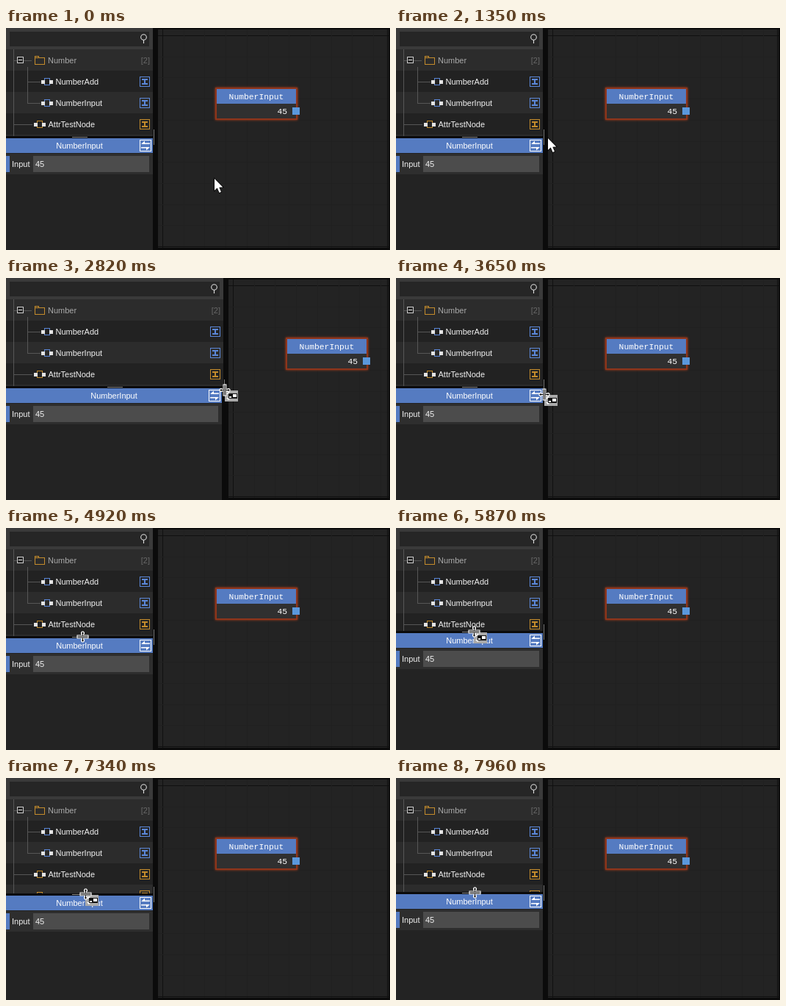
These frames come from a looping animation (523x302 px, 8.87 s). An HTML page with a canvas:

```html
<!DOCTYPE html>
<html lang="en">
<head>
<meta charset="utf-8">
<title>Node editor splitters</title>
<style>
  html, body { margin: 0; width: 100%; height: 100%; overflow: hidden; background: #0b0b0b; }
  canvas { display: block; }
</style>
</head>
<body>
<canvas id="stage" width="523" height="302"></canvas>
<script>
const ctx = document.getElementById('stage').getContext('2d');
const LOOP = 8870, BASE_W = 200, BASE_Y = 148;
const BLUE = '#557bc1', ACCENT = '#5b87d8', ORANGE = '#c48c2c', LINE = '#565656';
const SANS = '11px "Liberation Sans", Arial, sans-serif';
const MONO = '11.33px "Liberation Mono", "Courier New", monospace';

// time, pointer x, pointer y, pointer mode
const steps = [
  [0, 284, 205, 'arrow'], [100, 262, 187, 'arrow'],
  [930, 240, 174, 'arrow'], [1140, 220, 160, 'arrow'], [1350, 207, 150, 'arrow'],
  [1560, 204, 150, 'arrow'], [1770, 202, 151, 'h'], [1970, 202, 152, 'h'],
  [2590, 240, 152, 'hDrag'], [2820, 298, 152, 'hDrag'], [3030, 304, 153, 'hDrag'],
  [3240, 276, 155, 'hDrag'], [3340, 246, 157, 'hDrag'], [3440, 221, 158, 'hDrag'],
  [3650, 202, 158, 'hDrag'], [3860, 202, 158, 'h'],
  [4170, 180, 160, 'arrow'], [4380, 145, 157, 'arrow'], [4590, 118, 152, 'arrow'],
  [4710, 106, 149, 'v'], [4920, 104, 148, 'v'],
  [5870, 106, 141, 'vDrag'], [6080, 108, 132, 'vDrag'], [6290, 109, 136, 'vDrag'],
  [6460, 109, 144, 'vDrag'], [6700, 109, 150, 'vDrag'], [6920, 109, 155, 'vDrag'],
  [7130, 108, 158, 'vDrag'], [7340, 108, 158, 'vDrag'], [7550, 107, 157, 'vDrag'],
  [7760, 107, 156, 'vDrag'], [7960, 107, 156, 'vDone']
];

function rect(x, y, w, h, color) {
  ctx.fillStyle = color;
  ctx.fillRect(x, y, w, h);
}
function frame(x, y, w, h, color) {
  ctx.strokeStyle = color;
  ctx.lineWidth = 1;
  ctx.strokeRect(x + .5, y + .5, w - 1, h - 1);
}
function text(str, x, y, color = '#f2f2f2', align = 'left', font = SANS) {
  ctx.font = font;
  ctx.textAlign = align;
  ctx.textBaseline = 'alphabetic';
  ctx.fillStyle = color;
  ctx.fillText(str, x, y);
}
function shape(points, fill, stroke, width = 1) {
  ctx.beginPath();
  points.forEach(([x, y]) => ctx.lineTo(x, y));
  ctx.closePath();
  if (stroke) {
    ctx.strokeStyle = stroke;
    ctx.lineWidth = width;
    ctx.stroke();
  }
  ctx.fillStyle = fill;
  ctx.fill();
}
function clipped(x, y, w, h, draw) {
  ctx.save();
  ctx.beginPath();
  ctx.rect(x, y, w, h);
  ctx.clip();
  draw();
  ctx.restore();
}

function nodeRow(x, y, label, color, w) {
  frame(x + 4, y - 5, 8, 10, color);
  rect(x, y - 2, 5, 5, '#e4e4e4');
  rect(x + 11, y - 2, 5, 5, '#e4e4e4');
  if (label) text(label, x + 19.5, y + 4);
  const ix = w - 18, iy = y - 7;
  frame(ix, iy, 14, 14, color);
  rect(ix + 3, iy + 3, 8, 2, color);
  rect(ix + 6, iy + 5, 2, 4, color);
  rect(ix + 3, iy + 9, 8, 2, color);
}

function tree(w) {
  for (let i = 0; i < 5; i++) rect(0, 29 + i * 29, w, 29, i % 2 ? '#222' : '#2c2c2c');
  rect(10, 29, 1, 131, LINE);
  rect(10, 44, 25, 1, LINE);
  rect(10, 131, 26, 1, LINE);
  rect(29, 53, 1, 50, LINE);
  rect(29, 73, 18, 1, LINE);
  rect(29, 102, 18, 1, LINE);
  rect(15, 39, 9, 9, '#242424');
  frame(15, 39, 9, 9, '#ccc');
  rect(17, 43, 5, 1, '#eee');

  frame(39, 40, 14, 10, ORANGE);
  frame(39, 38, 6, 3, ORANGE);
  text('Number', 57, 48, '#aaa');
  text('[2]', w - 4, 48, '#686868', 'right');
  nodeRow(48, 73, 'NumberAdd', ACCENT, w);
  nodeRow(48, 102, 'NumberInput', ACCENT, w);
  nodeRow(38, 131, 'AttrTestNode', ORANGE, w);
  nodeRow(38, 160, '', ORANGE, w);
}

function searchBar(w) {
  rect(0, 0, w, 29, '#3a3a3a');
  rect(5, 5, w - 10, 20, '#262626');
  ctx.strokeStyle = '#ddd';
  ctx.lineWidth = 1.1;
  ctx.beginPath();
  ctx.arc(w - 12.5, 12.5, 3.8, 0, Math.PI * 2);
  ctx.moveTo(w - 12.5, 16.5);
  ctx.lineTo(w - 12.5, 21);
  ctx.stroke();
}

function properties(w, dy) {
  ctx.save();
  ctx.translate(0, dy);
  rect(0, 150, w, 200, '#232323');
  rect(0, 150, w, 20, BLUE);
  text('NumberInput', w / 2, 164, '#fff', 'center');
  frame(w - 18, 152, 16, 16, '#fff');
  shape([[w - 16, 158], [w - 11, 153.5], [w - 11, 156.5], [w - 4, 156.5], [w - 4, 158]], '#fff');
  shape([[w - 4, 162], [w - 9, 166.5], [w - 9, 163.5], [w - 16, 163.5], [w - 16, 162]], '#fff');
  rect(0, 171, w, 28, '#2e2e2e');
  rect(0, 174, 5, 22, BLUE);
  text('Input', 8, 189);
  rect(37, 174, w - 42, 22, '#4c4c4c');
  text('45', 40, 189);
  ctx.restore();
}

function graph(w) {
  const shift = w - BASE_W, cell = 28.7;
  clipped(w + 7, 2, 514 - w, 297, () => {
    rect(w + 7, 2, 514 - w, 297, '#232323');
    for (let i = 0; i < 11; i++) {
      const color = i ? '#202020' : '#101010';
      rect(Math.round(213 + shift + i * cell), 2, 1, 298, color);
      rect(w + 7, Math.round(10 + i * cell), 514 - w, 1, color);
    }
    rect(w + 7, 297, 514 - w, 1, '#101010');
    rect(519, 2, 1, 298, '#101010');
    ctx.translate(shift, 0);
    ctx.save();
    ctx.shadowColor = '#b5401c';
    ctx.shadowBlur = 3;
    rect(285, 81, 112, 44, '#8f351b');
    ctx.restore();
    rect(287, 83, 108, 40, '#303030');
    rect(287, 83, 108, 20, BLUE);
    text('NumberInput', 341, 97, '#fff', 'center', MONO);
    text('45', 383, 117, '#fff', 'right', MONO);
    rect(390, 108, 10, 10, '#5b98dc');
  });
}

function pointer(x, y, mode) {
  ctx.save();
  ctx.translate(x, y);
  if (mode === 'arrow') {
    shape([[0, 0], [0, 16], [3.7, 12.6], [6.5, 19], [9, 18], [6.3, 11.8], [11.3, 11.4]], '#fff', '#000', 1.5);
    ctx.restore();
    return;
  }
  if (mode.endsWith('Drag')) {
    rect(0, 1, 18, 15, '#aaa');
    shape([[2, 6], [5, 3], [8, 6]], '#fff');
    shape([[2, 11], [5, 14], [8, 11]], '#fff');
    rect(5, 5, 12, 7, '#111');
    rect(6, 9, 3, 2, '#fff');
    rect(11, 6, 5, 4, '#fff');
  }
  if (mode[0] === 'h') ctx.rotate(Math.PI / 2);
  // black paired bars with arrows, on a white outline
  for (const [grow, color] of [[1, '#fff'], [0, '#000']]) {
    for (const s of [-1, 1]) {
      const bar = (bx, by, w, h) =>
        rect(bx - w / 2 - grow, by * s - h / 2 - grow, w + 2 * grow, h + 2 * grow, color);
      bar(.5, 1, 14, 1);
      bar(.5, 3.5, 1, 4);
      bar(.5, 5, 3, 1);
      bar(.5, 6, 1, 1);
    }
  }
  ctx.restore();
}

function draw(now) {
  const t = now % LOOP;
  const i = steps.findLastIndex(s => s[0] <= t);
  const [, x, y, mode] = steps[i];
  const [, lastX, lastY] = steps[Math.max(0, i - 1)];
  const w = mode === 'hDrag' ? x - 2 : BASE_W;
  const dy = mode === 'vDrag' || mode === 'vDone' ? y - BASE_Y : 0;
  // the lower panel trails slightly while its splitter moves right or down
  const lagX = mode === 'hDrag' ? Math.min(2, Math.max(0, x - lastX)) : 0;
  const lagY = mode === 'vDrag' ? Math.min(3, Math.max(0, y - lastY)) : 0;

  rect(0, 0, 523, 302, '#0b0b0b');
  graph(w);
  clipped(0, 0, w, 147 + dy, () => {
    tree(w);
    searchBar(w);
  });
  clipped(0, 150 + dy, w, 302, () => properties(w - lagX, dy - lagY));
  rect(w / 2 - 10, 148 + dy, 21, 1, '#8a8a8a');
  rect(w + 1, 138 + dy, 1, 21, '#777');
  pointer(x, y, mode);
  requestAnimationFrame(draw);
}
requestAnimationFrame(draw);
</script>
</body>
</html>
```
